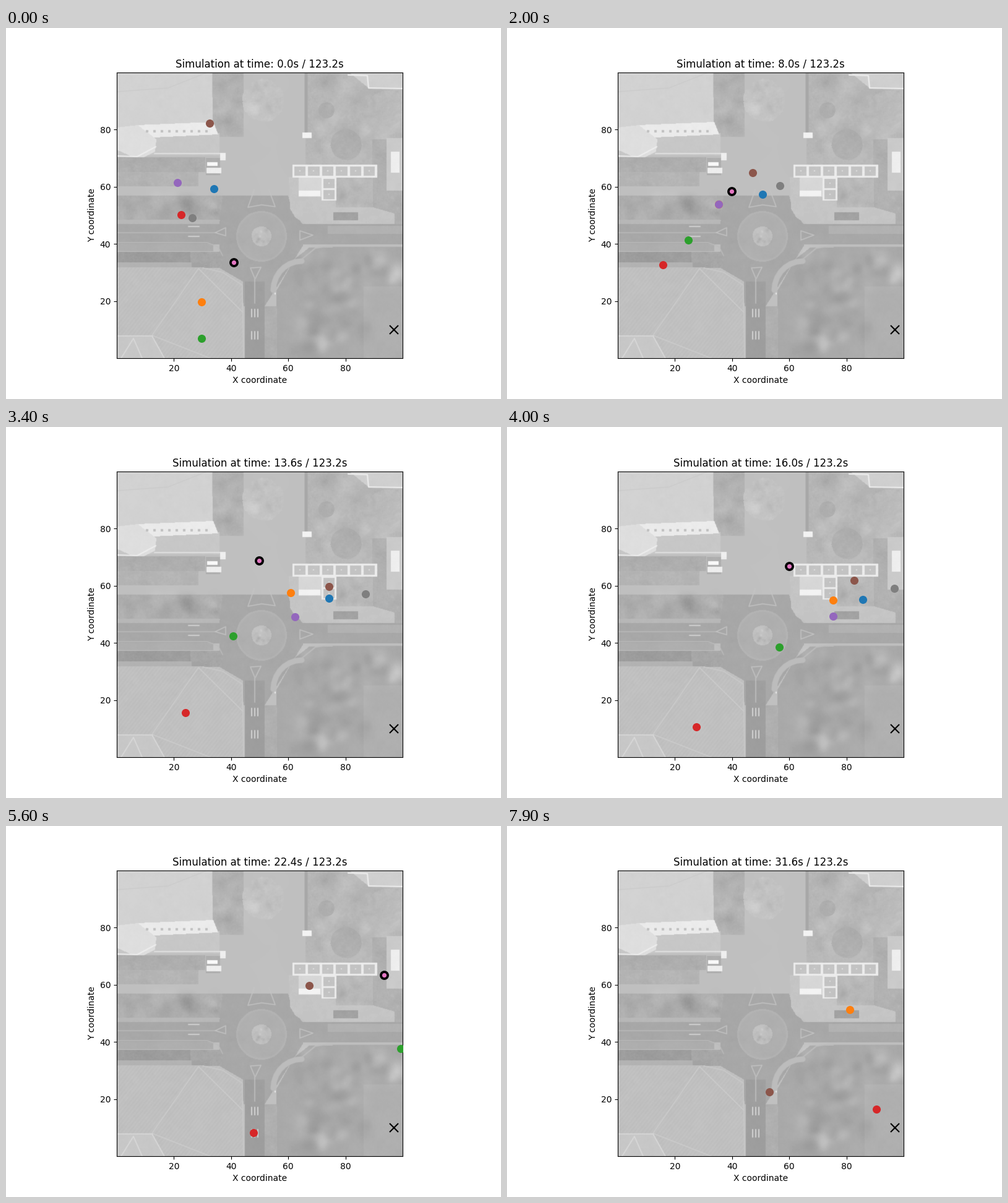
Animation of 800x600 px, one loop 8000 ms. Source, as a matplotlib script:

```python
import numpy as np
import matplotlib.pyplot as plt
from matplotlib.animation import FuncAnimation
from matplotlib.path import Path

FRAMES, STEP_MS, DT, TOTAL = 80, 100, 0.4, 123.2
LEFT, TOP, SIDE = 179, 72, 462      # map square on the stage, in pixels
RIGHT, BOTTOM = LEFT + SIDE, TOP + SIDE

WHITE, PALE, ROOF, PLAZA, GREY, LEAF, ROAD, DARK = 0.93, 0.87, 0.82, 0.75, 0.72, 0.68, 0.655, 0.62

rng = np.random.default_rng(4)
X, Y = np.meshgrid(LEFT + 0.5 + np.arange(SIDE), TOP + 0.5 + np.arange(SIDE))
img = np.full((SIDE, SIDE), PLAZA)


def smooth_noise(n):
    """Random n x n grid stretched linearly over the map."""
    grid = rng.normal(size=(n, n))
    src, dst = np.linspace(0, 1, n), np.linspace(0, 1, SIDE)
    rows = np.array([np.interp(dst, src, r) for r in grid])
    return np.array([np.interp(dst, src, c) for c in rows.T]).T


grain = sum(smooth_noise(n) for n in (230, 60, 18)) / 2


def put(inside, tone, leafy=False):
    img[inside] = (tone + (0.015 if leafy else 0.006) * grain)[inside]


def poly(tone, *xy):
    pts = np.reshape(xy, (-1, 2))
    put(Path(pts).contains_points(np.c_[X.ravel(), Y.ravel()]).reshape(X.shape), tone)


def rect(tone, x0, y0, x1, y1, leafy=False):
    put((X > x0) & (X < x1) & (Y > y0) & (Y < y1), tone, leafy)


def disc(tone, cx, cy, r, leafy=False):
    put(np.hypot(X - cx, Y - cy) < r * (1 + 0.03 * grain * leafy), tone, leafy)


def line(tone, *xy, width=1.4):
    pts = np.reshape(xy, (-1, 2)).astype(float)
    dist = np.full(X.shape, 1e3)
    for (x0, y0), (x1, y1) in zip(pts, pts[1:]):
        dx, dy = x1 - x0, y1 - y0
        u = np.clip(((X - x0) * dx + (Y - y0) * dy) / (dx * dx + dy * dy), 0, 1)
        dist = np.minimum(dist, np.hypot(X - x0 - u * dx, Y - y0 - u * dy))
    a = np.clip(width / 2 + 0.5 - dist, 0, 1)
    img[:] = img * (1 - a) + tone * a


def foliage(x0, y0, x1, y1, n, r=14, amp=0.035):
    """Soft light and dark tufts scattered in a box."""
    for _ in range(n):
        cx, cy = rng.uniform(x0, x1), rng.uniform(y0, y1)
        s = r * rng.uniform(0.5, 1)
        img[:] += amp * rng.uniform(-1, 1) * np.exp(-((X - cx) ** 2 + (Y - cy) ** 2) / s ** 2)


def north_side():
    rect(0.7, 334, TOP, 384, 176, True)
    foliage(345, 80, 380, 170, 18)
    disc(0.765, 416, 117, 34, True)
    foliage(390, 90, 442, 140, 20, 8)
    rect(0.78, LEFT, 170, 345, 206)
    poly(ROOF, LEFT, TOP, 333, TOP, 334, 153, LEFT, 161)
    line(0.79, LEFT, 103, 262, 97, 322, 73)
    poly(0.92, 212, 157, 335, 152, 343, 172, 238, 177)
    poly(PALE, LEFT, 161, 213, 157, 243, 180, 241, 200, 215, 213, LEFT, 197)
    line(WHITE, LEFT, 207, 212, 208, 242, 192, width=2)
    for x in range(226, 330, 12):
        rect(0.76, x, 165, x + 4, 169)
    rect(LEAF, LEFT, 209, 322, 233, True)
    rect(0.7, LEFT, 233, 311, 256, True)
    line(PALE, 240, 203, 350, 203, width=2)
    rect(WHITE, 346, 202, 355, 214)
    rect(LEAF, 323, 210, 346, 238)
    rect(0.97, 325, 217, 342, 223)
    rect(WHITE, 324, 226, 348, 235)
    rect(LEAF, LEFT, 271, 350, 311, True)
    foliage(182, 275, 345, 308, 40)
    rect(GREY, LEFT, 310, 345, 317)


def gardens():
    rect(GREY, 484, TOP, RIGHT, 222, True)
    foliage(490, 80, 635, 215, 40)
    line(ROAD, 485, TOP, 485, 168, width=5)
    disc(LEAF, 518, 133, 13, True)
    disc(LEAF, 550, 188, 25, True)
    disc(0.73, 614, 130, 29, True)
    rect(0.95, 479, 169, 494, 178)
    poly(0.81, 555, TOP, RIGHT, TOP, RIGHT, 98, 586, 97)
    line(WHITE, 553, 76, 584, 77, 586, 97, RIGHT, 98, width=2)
    rect(0.69, 592, 180, RIGHT, 318, True)
    rect(0.79, 615, 178, RIGHT, 263)
    rect(WHITE, 622, 200, 636, 234)


def roads():
    rect(ROAD, LEFT, 317, RIGHT, 350)
    poly(ROAD, 350, 271, 456, 271, 462, 296, 480, 318, 480, 352, 418, 450, 383, 450, 383, 410, 345, 388, 345, 317)
    rect(DARK, 386, 410, 418, BOTTOM)
    rect(LEAF, LEFT, 349, 335, 361)
    rect(0.61, LEFT, 362, 298, 379, True)
    rect(ROAD, 298, 362, 350, 388, True)
    rect(0.7, LEFT, 379, 300, 388)
    rect(0.695, 520, 320, RIGHT, 333)
    line(0.73, LEFT, 331, 340, 331)
    line(0.73, LEFT, 347, 325, 347, 343, 354, 350, 368)
    disc(0.7, 413, 337, 41)
    disc(0.685, 413, 337, 38)
    disc(PLAZA, 413, 337, 16, True)
    foliage(402, 327, 425, 347, 14, 4, 0.06)
    paint = 0.765
    line(paint, 401, 262, 391, 290, 413, 286, 435, 289, 425, 262)
    line(paint, 475, 328, 475, 343, 496, 335, 475, 328)
    line(paint, 338, 331, 355, 323, 355, 336, 338, 331)
    line(paint, 402, 445, 402, 405, 395, 388, 412, 387, 403, 405)
    for y in (321, 337):
        line(0.8, 295, y, 312, y, width=2)
    for y in (455, 491):
        for x in (397, 402, 407):
            line(ROOF, x, y, x, y + 12, width=2)


def terrace_house():
    poly(0.77, 457, 241, 593, 241, 593, 290, 628, 300, 628, 317, 485, 317, 468, 307, 459, 292)
    rect(GREY, 533, 241, 593, 290, True)
    foliage(536, 245, 575, 280, 14, 9)
    rect(0.63, 529, 298, 569, 311, True)
    rect(0.92, 463, 221, 600, 242)
    rect(0.92, 510, 241, 534, 279)
    cells = [(466 + 22.4 * i, 224) for i in range(6)] + [(513, 244), (513, 262)]
    for x, y in cells:
        rect(0.765, x, y, x + 18.5, y + 15)
        rect(PALE, x + 8, y + 6, x + 10, y + 8)
    rect(0.84, 473, 242, 510, 273)
    rect(0.95, 473, 263, 508, 272)


def south_side():
    poly(PLAZA, LEFT, 387, 318, 387, 350, 394, 383, 416, 385, BOTTOM, LEFT, BOTTOM)
    roof = (Y > 387) & (X < 384) & (img > 0.72)
    img[roof] += (0.008 * np.sin(X + 0.8 * Y))[roof]
    line(0.8, 383, 460, 311, 389, 236, 497, 330, BOTTOM)
    line(0.79, 318, 388, 350, 395, 382, 416, 384, BOTTOM)
    poly(0.78, LEFT, 498, 236, 498, 256, BOTTOM, LEFT, BOTTOM)
    line(0.86, LEFT, 498, 236, 498, 256, BOTTOM)
    line(0.86, 186, BOTTOM, 206, 502, 220, BOTTOM)
    poly(0.66, 466, 374, 490, 355, RIGHT, 353, RIGHT, BOTTOM, 437, BOTTOM, 437, 425)
    rect(0.685, 578, 418, RIGHT, BOTTOM)
    foliage(470, 362, 585, 525, 130)
    foliage(585, 360, 638, 412, 35)
    rect(0.685, 418, 450, 438, BOTTOM, True)
    a = np.linspace(0, np.pi / 2, 8)
    line(0.735, *np.c_[478 - 46 * np.cos(a), 424 - 47 * np.sin(a)].ravel(), width=9)
    line(0.735, 478, 374, 500, 356, 520, 353, RIGHT, 353, width=2)
    rect(0.9, 434, 428, 436, 431)


for part in (north_side, gardens, roads, terrace_house, south_side):
    part()
pad = np.pad(img, 1, mode="edge")
img = (pad[1:-1, 1:-1] * 4 + pad[:-2, 1:-1] + pad[2:, 1:-1]
       + pad[1:-1, :-2] + pad[1:-1, 2:]) / 8


def to_data(x, y):
    return (x - LEFT) * 100 / SIDE, (BOTTOM - y) * 100 / SIDE


fig, ax = plt.subplots(figsize=(8, 6), dpi=100)
ax.imshow(img, cmap="gray", vmin=0, vmax=1, extent=(0, 100, 0, 100), interpolation="nearest")
ax.set(xlim=(0, 100), ylim=(0, 100), xlabel="X coordinate", ylabel="Y coordinate",
       xticks=range(20, 100, 20), yticks=range(20, 100, 20))
title = ax.set_title("")
ax.plot(*to_data(626.5, 487.5), "kx", ms=10, mew=1.5)

KEYS = (0, 12, 28, 40, 48)


class Walker:
    """A dot on a smooth path; it keeps its speed past the ends and leaves the map."""

    def __init__(self, colour, xs, ys, steps=KEYS, ringed=False):
        self.t = np.array(steps[:len(xs)], float)
        self.p = np.c_[xs, ys]
        self.m = np.gradient(self.p, self.t, axis=0)
        look = dict(ms=8, mec="black", mew=2.7) if ringed else dict(ms=8.4)
        self.dot, = ax.plot([], [], "o", color=f"C{colour}", zorder=3, **look)

    def at(self, k):
        t, p, m = self.t, self.p, self.m
        if k < t[0]:
            return p[0] + (k - t[0]) * m[0]
        if k >= t[-1]:
            return p[-1] + (k - t[-1]) * m[-1]
        i = np.searchsorted(t, k, side="right") - 1
        h = t[i + 1] - t[i]
        u = (k - t[i]) / h
        s = u * u * (3 - 2 * u)
        return (p[i] + s * (p[i + 1] - p[i])
                + u * (1 - u) * h * ((1 - u) * m[i] - u * m[i + 1]))

    def move(self, k):
        x, y = to_data(*self.at(k))
        self.dot.set_data([x], [y])
        return self.dot


walkers = [
    Walker(0, (336, 369, 470, 574.5, 631), (259.5, 264, 274.5, 278.5, 280)),
    Walker(1, (315.5, 310.5, 399, 527, 611), (442.5, 332, 262, 279.5, 285)),
    Walker(2, (316, 304, 309.5, 440, 539), (502, 388, 325, 355.5, 357.5)),
]
walkers.append(Walker(3, (283, 280, 251, 276, 306, 349, 385.5, 475.5, 597),
                      (302, 339, 395, 430.5, 485, 493, 496.5, 483, 457.5),
                      (0, 12, 22, 28, 40, 48, 54, 65, 79)))
walkers.append(Walker(4, (277, 294.5, 408, 527, 598.5), (249.5, 262, 305, 306, 310.5)))
walkers.append(Walker(5, (329, 344, 466, 560.5, 545.5, 428, 416.5, 424),
                      (154, 194, 263.5, 248, 247, 299, 362, 430), KEYS + (65, 72, 79)))
walkers.append(Walker(6, (368, 366.5, 376, 456, 533.5), (378.5, 324, 216.5, 225, 233), ringed=True))
walkers.append(Walker(7, (300.5, 357.5, 532, 626), (307, 243, 276, 260.5)))
walkers.append(Walker(1, (624, 553.5), (295, 296.5), (72, 79)))


def update(k):
    title.set_text(f"Simulation at time: {k * DT:.1f}s / {TOTAL}s")
    return [title] + [w.move(k) for w in walkers]


anim = FuncAnimation(fig, update, frames=FRAMES, interval=STEP_MS, repeat=True, repeat_delay=0)
plt.show()
```
